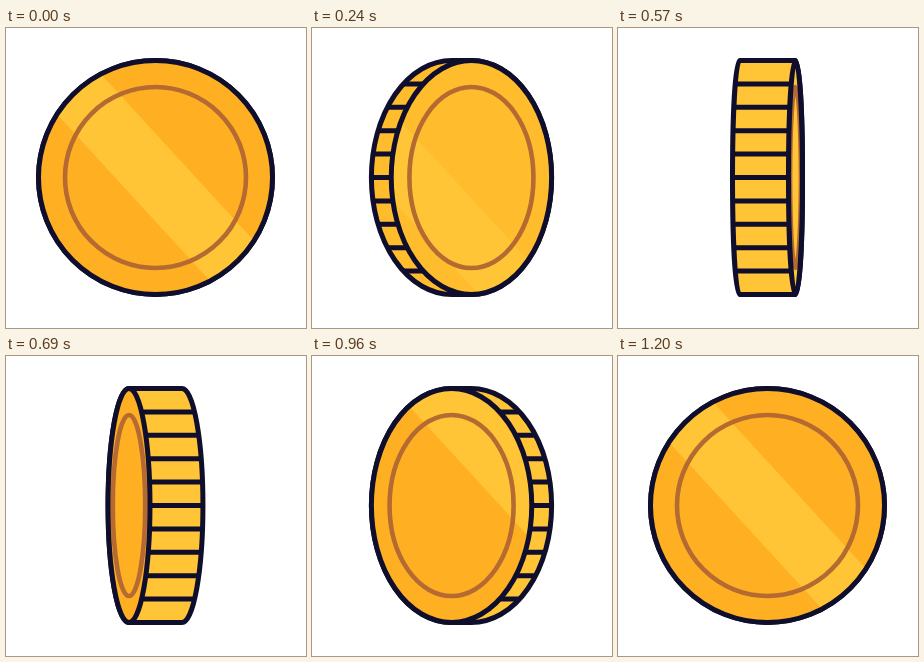
An HTML page with a canvas that plays this animation: 300 by 300 pixels, repeating every 1.23 s.

```html
<!DOCTYPE html>
<html lang="en">
<head>
<meta charset="utf-8">
<title>Spinning coin</title>
<style>
html, body { margin: 0; width: 100%; height: 100%; overflow: hidden; background: #fff; }
canvas { display: block; width: 300px; height: 300px; }
</style>
</head>
<body>
<canvas id="stage" width="300" height="300"></canvas>
<script>
const ctx = document.getElementById('stage').getContext('2d');

const LOOP = 1230, STEP = 30, HALF_TURN = 600;
const CENTER = 149.5, RADIUS = 117, RING = 90.5, DEPTH = 28.2;
const INK = '#0f0f2d', RING_COLOR = '#b56a31';
const DARK = [255, 175, 34], LIGHT = [255, 197, 54];
const BAND_SLOPE = 1.09, BAND_HALF = 44;

const clamp = v => Math.min(1, Math.max(0, v));
const smooth = p => p * p * (3 - 2 * p);
const mix = k => `rgb(${DARK.map((d, i) => Math.round(d + (LIGHT[i] - d) * k))})`;

function bezierEase(x1, y1, x2, y2) {
  const at = (a, b, u) => 3 * (1 - u) * (1 - u) * u * a + 3 * (1 - u) * u * u * b + u * u * u;
  return x => {
    let lo = 0, hi = 1;
    for (let i = 0; i < 30; i++) {
      const mid = (lo + hi) / 2;
      if (at(x1, x2, mid) < x) lo = mid; else hi = mid;
    }
    return at(y1, y2, (lo + hi) / 2);
  };
}
const turnEase = bezierEase(0.167, 0, 0.75, 0.7);

function ellipse(x, rx, ry) {
  ctx.beginPath();
  ctx.ellipse(x, CENTER, rx, ry, 0, 0, Math.PI * 2);
}

function stroke(color, width) {
  ctx.strokeStyle = color;
  ctx.lineWidth = width;
  ctx.stroke();
}

// Outline of the coin's body: both faces joined by straight edges.
function bodyPath(rx, offset) {
  ctx.beginPath();
  ctx.ellipse(CENTER - offset, CENTER, rx, RADIUS, 0, Math.PI / 2, Math.PI * 1.5);
  ctx.ellipse(CENTER + offset, CENTER, rx, RADIUS, 0, -Math.PI / 2, Math.PI / 2);
  ctx.closePath();
}

function drawRim(rx, offset, color) {
  bodyPath(rx, offset);
  ctx.fillStyle = color;
  ctx.fill();
  ctx.save();
  ctx.clip();
  ctx.beginPath();
  for (let i = 1; i < 10; i++) {
    const y = CENTER - RADIUS + i * RADIUS / 5;
    ctx.moveTo(0, y);
    ctx.lineTo(300, y);
  }
  stroke(INK, 5);
  ctx.restore();
  bodyPath(rx, offset);
  stroke(INK, 5);
}

function drawBand(x, shift) {
  const reach = 160, rise = reach * BAND_SLOPE, y = CENTER + shift;
  ctx.beginPath();
  ctx.moveTo(x - reach, y - rise - BAND_HALF);
  ctx.lineTo(x + reach, y + rise - BAND_HALF);
  ctx.lineTo(x + reach, y + rise + BAND_HALF);
  ctx.lineTo(x - reach, y - rise + BAND_HALF);
  ctx.fillStyle = mix(1);
  ctx.fill();
}

function drawFace(x, rx, color, shift) {
  ctx.save();
  ellipse(x, rx, RADIUS);
  ctx.fillStyle = color;
  ctx.fill();
  ctx.clip();
  drawBand(x, shift);
  ellipse(x, rx * RING / RADIUS, RING);
  stroke(RING_COLOR, 4.6);
  ctx.restore();
  ellipse(x, rx, RADIUS);
  stroke(INK, 5);
}

function draw(time) {
  const t = Math.min(time, HALF_TURN * 2);
  const leaving = t <= HALF_TURN;
  const away = leaving ? t : HALF_TURN * 2 - t;
  const p = away / HALF_TURN;
  const rx = RADIUS * (1 - turnEase(p));
  const offset = DEPTH * smooth(p);
  const glow = clamp(t / 420);
  const shift = leaving ? 65 * away / 240 : -97 * Math.pow(away / 240, 1.2);

  ctx.fillStyle = '#fff';
  ctx.fillRect(0, 0, 300, 300);
  ctx.lineJoin = 'round';
  drawRim(rx, offset, mix(glow));
  drawFace(CENTER + (leaving ? offset : -offset), rx, mix(leaving ? glow : 0), shift);
}

const start = performance.now();
function tick() {
  const time = (performance.now() - start) % LOOP;
  draw(Math.floor(time / STEP) * STEP);
  requestAnimationFrame(tick);
}
tick();
</script>
</body>
</html>
```
